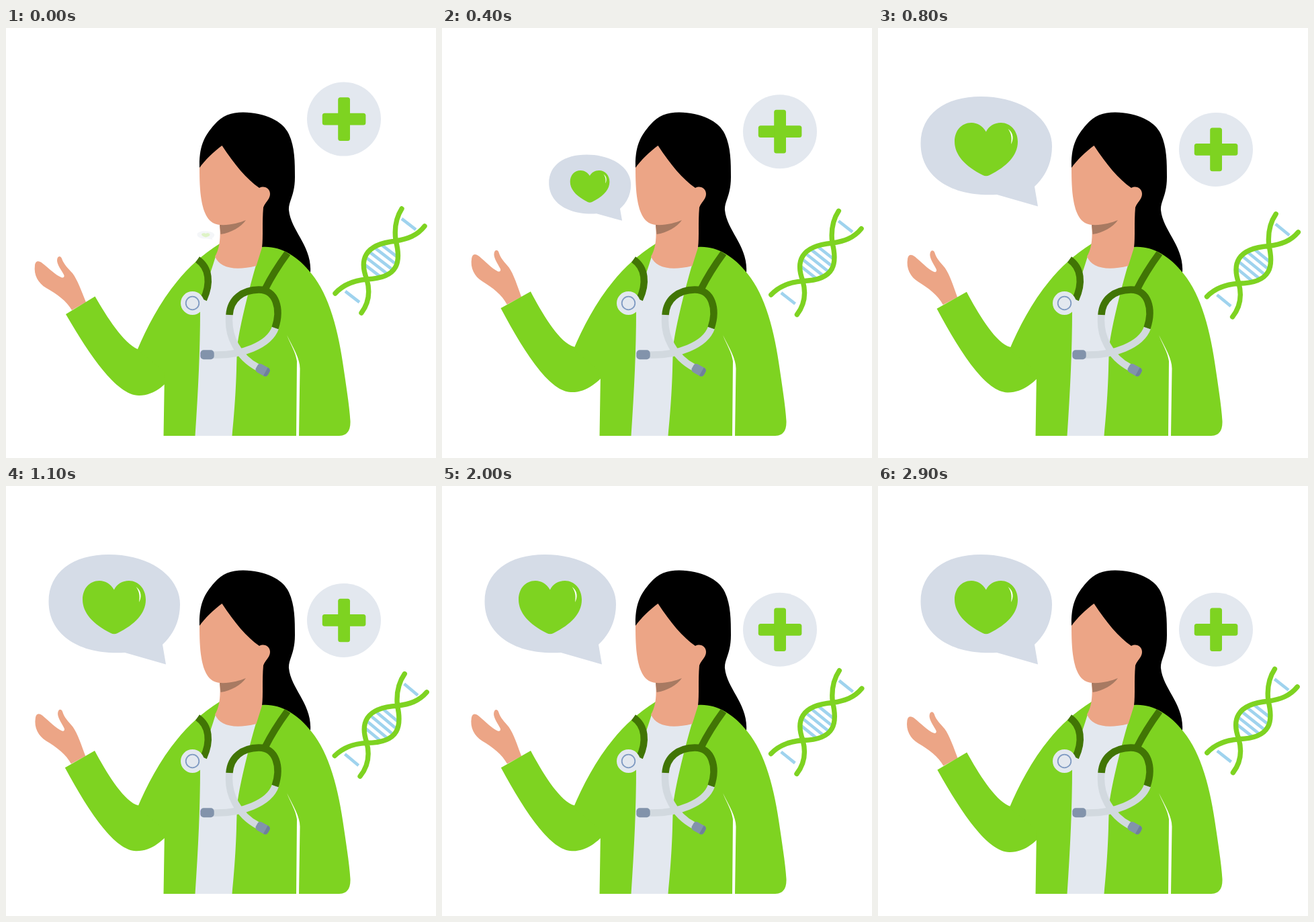
Write an HTML page that moves like this. It is 640 px wide and 640 px high and loops after 3 s.

```html
<!DOCTYPE html>
<html lang="en">
<head>
<meta charset="utf-8">
<title>Doctor</title>
<style>
  html, body { margin: 0; width: 100%; height: 100%; overflow: hidden; background: #fff; }
  svg { display: block; width: 100%; height: 100%; }
  .green { fill: #7ed321; }
  .skin { fill: #eca586; }
  .pale { fill: #e3e8ef; }
  .line { fill: none; stroke-width: 10.5; }
  .dark { stroke: #417505; }
  .tube { stroke: #d2d9df; }
  .tip { fill: #8293ab; }
</style>
</head>
<body>
<svg viewBox="0 0 640 640">
  <g id="badge">
    <circle class="pale" cx="503" cy="135.6" r="55"/>
    <g class="green">
      <rect id="bar" x="470.8" y="126.7" width="64.6" height="17.8" rx="3.5"/>
      <use href="#bar" transform="rotate(90 503.1 135.6)"/>
    </g>
  </g>

  <g id="dna" fill="none">
    <path id="rungs" stroke="#9fd3ee" stroke-width="4.6"/>
    <path stroke="#7ed321" stroke-width="7.4" stroke-linecap="round" d="
      M589,269 C580,283 578,300 580,316 C588,346 586,372 537,374 C515,376 500,384 490,395
      M623,295 C612,309 598,314 580,317 C532,322 526,346 537,374 C543,395 538,412 529,424"/>
  </g>

  <!-- hair -->
  <path d="M288,209 C287,175 296,160 310,144 C322,130 335,125.5 353,125.5 C385,126 412,138 421,158
    C430,177 430,200 430,222 C430,250 420,258 421,271 C424,302 456,325 453,364 L370,340 L340,220 Z"/>

  <g id="arm">
    <path class="skin" d="M98,420 C90,406 76,396 60,387 C48,380 41,368 43,353 C44,346 49,346 54,350
      C63,357 74,368 83,371.5 C86,372 87.5,370 86,367 C82,360 76,352 76,346 C76,339 81,338 83,343
      C86,352 92,357 99,365 C106,374 113,393 119,408 Z"/>
    <path class="green" d="M89,426 L132.5,399.5 C150,430 175,469 196,478 L206,481 L250,478 L256,508
      C240,529 222,547 198,547 C165,547 125,488 89,426 Z"/>
  </g>

  <!-- coat, shirt, head and neck -->
  <path class="green" d="M195.5,479 C218,427 252,362 318,321 L381,326 C407,324 433,338 455,366
    C481,398 495,450 503,510 C507,537 511,563 512.5,585 C513,600 507,607 496,607 H234.5 L236,512 Z"/>
  <path fill="#fff" d="M418,457 C424,472 431,482 433,496 L432,607 H436 L437.5,508 C438,493 428,477 418,457 Z"/>
  <path class="pale" d="M312,340 L373,350 C364,380 351,430 345,467 C342,495 345,520 336.5,607 H281.5
    C286,540 289,480 289,420 C291,400 303,370 312,340 Z"/>
  <path class="skin" d="M288,208 C296,197 309,184 321.5,175 C340,203 358,225 377,238 C385,234 393,239 393,247
    C393,255 386,259 383,267 C381,290 383,310 381,327 L372.5,354 C340,362 318,357 311,340
    C317,330 320,315 318,293 C291,291 288,250 288,208 Z"/>
  <path fill="#a87a62" d="M318,293 C333,294 347,290 357,286 C350,296 335,305 319.5,307 Z"/>

  <!-- stethoscope -->
  <path class="line dark" d="M285,344.5 C303,357 305,380 294,404"/>
  <circle class="pale" cx="277.5" cy="409.5" r="17.5"/>
  <circle cx="277.5" cy="409.5" r="9.8" fill="none" stroke="#7f9ac2" stroke-width="1.8"/>
  <path class="line tube" d="M332.5,427 C329,458 345,490 376,506 M401,446 C392,472 350,488 308,486.5"/>
  <path class="line dark" d="M419,335 C408,350 396,368 386,388
    M332.5,427 C334,403 352,390 376,389.5 C402,389 410,418 400.5,446.5"/>
  <rect class="tip" x="289.3" y="479.3" width="20.4" height="14" rx="5"/>
  <g transform="rotate(29 382 509)">
    <rect class="tip" x="372" y="502" width="20.4" height="14" rx="4.5"/>
    <path fill="#6f809b" d="M387,502 Q392.4,502 392.4,507 V511 Q392.4,516 387,516 Z"/>
  </g>

  <g id="bubble">
    <path fill="#d5dce7" d="M63.5,172 C63.5,128 100,102 153,102 C215,102 259,135 259,176
      C259,200 250,220 233,236 L238,265.5 L177,248 C110,252 63.5,222 63.5,172 Z"/>
    <path class="green" d="M160.8,154.5 C156,146 148,141 139,141 C124,141 114,153 114,169
      C114,189 130,206 156,219 Q160.8,221.5 166,219 C192,206 208,190 208,169
      C208,153 197,141 183,141 C173,141 165,146 160.8,154.5 Z"/>
    <path fill="#fff" d="M193.5,150 C202,156 202,166 198,173 C199.5,163 198.5,157 193.5,150 Z"/>
  </g>
</svg>
<script>
  const LOOP = 3000, STEP = 100;
  const PIVOT = "328 380";
  const part = id => document.getElementById(id);
  const move = (id, transform) => part(id).setAttribute("transform", transform);

  // Parallel rungs, symmetric about the middle of the helix.
  function drawRungs() {
    const slope = 0.77, gap = 12.2;
    const rung = (x, y, half) =>
      `M${x - half},${y - half * slope} l${2 * half},${2 * half * slope}`;
    let d = "";
    for (let i = -2; i <= 2; i++) {
      d += rung(557.5 - i * 6, 346 + i * (gap - 6 * slope), 18 - 3 * Math.abs(i));
    }
    for (const side of [-1, 1]) {
      d += rung(557.5 - side * 42, 346 + side * 54, 14 - 3.5);
      d += rung(557.5 - side * 40, 346 + side * 53, 0);
      d += rung(557.5 - side * 41, 346 + side * 55, 0);
    }
    part("rungs").setAttribute("d", d);
  }

  // Gentle ease in and out: halfway between linear and smoothstep.
  const ease = u => (u + u * u * (3 - 2 * u)) / 2;

  function tween(t, start, end, from, to) {
    const u = Math.min(1, Math.max(0, (t - start) / (end - start)));
    return from + (to - from) * ease(u);
  }

  function armAngle(t) {
    if (t < 550) return tween(t, 0, 550, 0, 2.75);
    if (t < 1000) return tween(t, 550, 1000, 2.75, 1.4);
    if (t < 1450) return tween(t, 1000, 1450, 1.4, 2.7);
    return tween(t, 1450, 2400, 2.7, 0.85);
  }

  function draw(t) {
    const dnaAngle = tween(t, 0, 1200, 0, 2.42) - tween(t, 1200, 2400, 0, 1.67);
    const scaleX = tween(t, -170, 780, 0, 1), scaleY = tween(t, -100, 760, 0, 1);
    move("arm", `rotate(${armAngle(t)} ${PIVOT})`);
    move("dna", `rotate(${dnaAngle} ${PIVOT})`);
    move("badge", `translate(0 ${tween(t, 0, 1420, 0, 78.2)})`);
    move("bubble", `translate(318 319) scale(${scaleX} ${scaleY}) translate(-318 -319)`);
    part("bubble").setAttribute("opacity", tween(t, 0, 300, 0.25, 1));
  }

  const start = performance.now();
  function tick() {
    const t = (performance.now() - start) % LOOP;
    draw(Math.floor(t / STEP) * STEP);
    requestAnimationFrame(tick);
  }
  drawRungs();
  tick();
</script>
</body>
</html>
```
